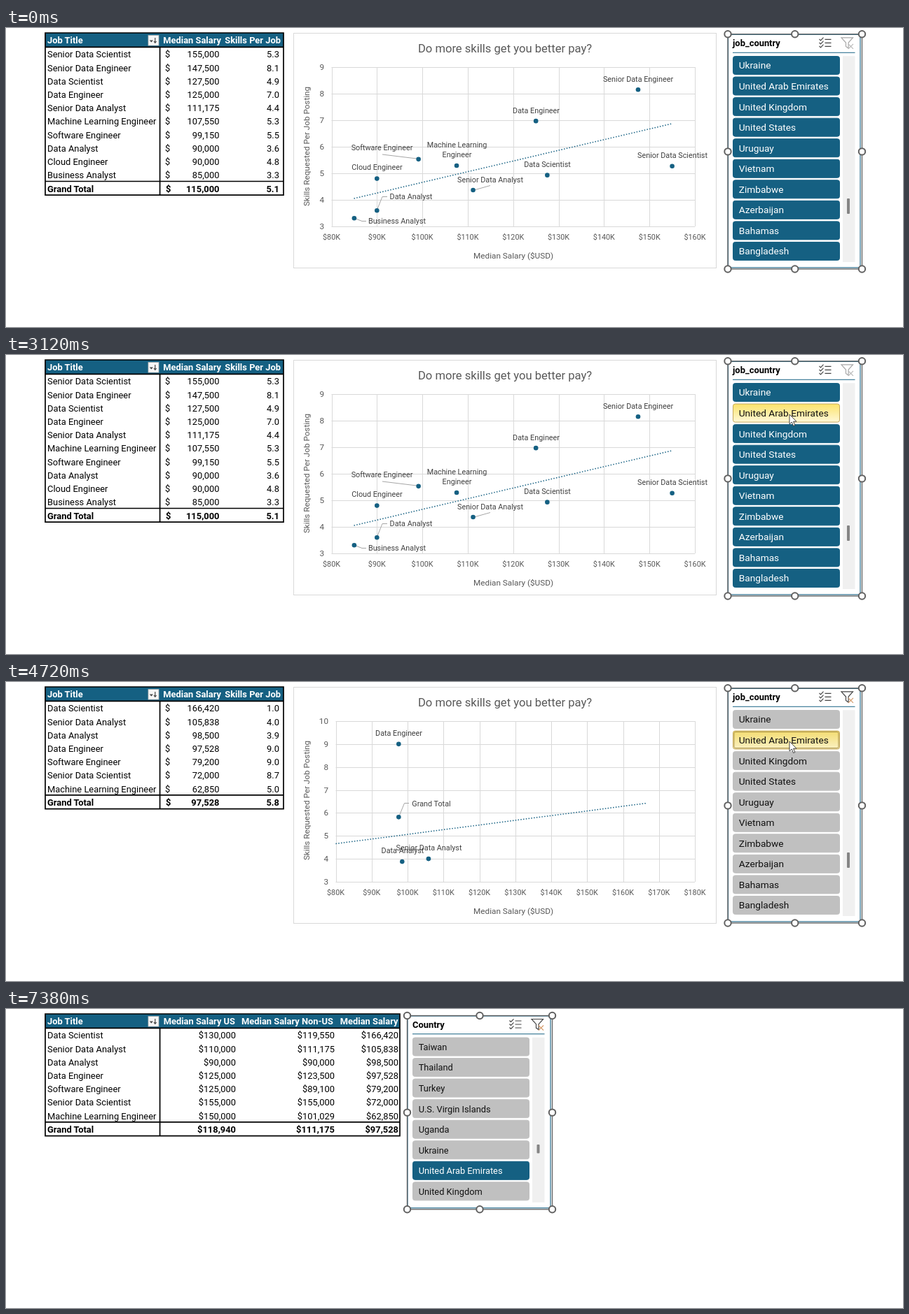
Write an HTML page that moves like this. It is 1280x428 px and loops after 8000 ms.

```html
<!DOCTYPE html>
<html lang="en">
<head>
<meta charset="utf-8">
<title>Skills and pay dashboard</title>
<style>
html, body { margin: 0; width: 100%; height: 100%; overflow: hidden; background: #fff; }
svg { display: block; width: 100%; height: 100%; font-family: Roboto, "Open Sans", sans-serif; }
text { white-space: pre; }
</style>
</head>
<body>
<svg id="stage" viewBox="0 0 1280 428"></svg>
<script>
const LOOP = 8000, TEAL = '#156082', GREY = '#c0c0c0';
const stage = document.getElementById('stage');

const text = (x, y, s, size, { anchor = 'start', fill = '#000', weight = 400, extra = '' } = {}) =>
  `<text x="${x}" y="${y}" font-size="${size}" text-anchor="${anchor}" fill="${fill}" font-weight="${weight}" ${extra}>${s}</text>`;
const rect = (x, y, w, h, fill, extra = '') =>
  `<rect x="${x}" y="${y}" width="${w}" height="${h}" fill="${fill}" ${extra}/>`;
const path = (d, stroke, width = 1, extra = '') =>
  `<path d="${d}" fill="none" stroke="${stroke}" stroke-width="${width}" ${extra}/>`;

// Tables: columns are { right, head, headRight }; a row is [title, ...cells].
function table(right, columns, rows, dollarColumn) {
  const pitch = 19.2, size = 12.9;
  const totalTop = 27.5 + (rows.length - 1) * pitch, bottom = totalTop + 19.7;
  let out = rect(55, 6, right - 55, bottom - 5, '#fff') + rect(56, 7, right - 57, 20.5, TEAL);
  const head = { fill: '#fff', weight: 700 };
  out += text(59, 22.3, 'Job Title', size, head);
  for (const c of columns) out += text(c.headRight, 22.3, c.head, size, { ...head, anchor: 'end' });
  rows.forEach((row, i) => {
    const last = i === rows.length - 1, weight = last ? 700 : 400;
    const y = 42.3 + i * pitch + (last ? 0.4 : 0);
    out += text(59, y, row[0], size, { weight });
    if (dollarColumn) out += text(last ? 228 : 227, y, '$', size, { weight });
    columns.forEach((c, k) => out += text(c.right, y, row[k + 1], size, { weight, anchor: 'end' }));
  });
  out += path(`M56 7H${right - 1}V${bottom}H56ZM56 27.3H${right - 1}M56 ${totalTop}H${right - 1}M219.6 27V${bottom}`, '#000', 1.7);
  return out + rect(203, 10.5, 15, 14.5, '#f7f7f7', 'stroke="#b5b5b5" stroke-width=".8"')
    + path('M212.8 14V21M211 19L212.8 21.3L214.6 19', '#444', 1.2)
    + '<path d="M204.8 17.5H210L207.4 20.5Z" fill="#444"/>';
}

function chart({ left, bottom, xTo, yTo, trend, points, labels, leaders }) {
  const right = 983, top = 56;
  const px = v => left + (v - 80) / (xTo - 80) * (right - left);
  const py = v => bottom - (v - 3) / (yTo - 3) * (bottom - top);
  const ink = '#595959', mid = { anchor: 'middle', fill: ink };
  let out = rect(410.5, 7.5, 603, bottom + 52, '#fff', 'stroke="#d9d9d9"');
  out += text(712, 35.3, 'Do more skills get you better pay?', 16.6, mid);
  for (let v = 80; v <= xTo; v += 10) {
    const x = Math.round(px(v)) + 0.5;
    out += path(`M${x} ${top}V${bottom}`, '#d9d9d9') + text(px(v), bottom + 19, `$${v}K`, 10.8, mid);
  }
  for (let v = 3; v <= yTo; v++) {
    const y = Math.round(py(v)) + 0.5;
    out += path(`M${left} ${y}H${right}`, '#d9d9d9')
      + text(left - 10.5, py(v) + 4, v, 11.7, { anchor: 'end', fill: ink });
  }
  out += text(724, bottom + 45.5, 'Median Salary ($USD)', 11.75, mid);
  out += text(0, 0, 'Skills Requested Per Job Posting', 11.7, { ...mid, extra: 'transform="translate(432.5 169.5) rotate(-90)"' });
  out += path(trend, TEAL, 1.5, 'stroke-dasharray="1.5 2.3"');
  for (const d of leaders) out += path(d, '#a6a6a6');
  for (const [x, y] of points) out += `<circle cx="${px(x)}" cy="${py(y)}" r="3.3" fill="${TEAL}"/>`;
  for (const [x, y, s] of labels) out += text(x, y, s, 10.8, { anchor: 'middle', fill: '#404040' });
  return out;
}

function icons(right, top, filtered) {
  const x = right - 61, f = right - 29.5, ink = filtered ? '#444' : '#a8a8a8';
  let out = '';
  for (let i = 0; i < 3; i++) {
    const y = top + 7.5 + i * 5;
    out += path(`M${x} ${y - .5}l2 2l4-4.2M${x + 8} ${y}h9`, '#444', 1.2);
  }
  out += path(`M${f} ${top + 5}h16.5l-6.4 7.2v8l-3.6-2.6v-5.4Z`, ink, 1.2);
  return out + path(`M${f + 10} ${top + 14}l7 7m0-7l-7 7`, filtered ? '#d39a6a' : '#b8b8b8', 1.2);
}

// style(i) gives the look of each button: 'blue', 'grey', 'hover', 'pressed' or 'focus'.
function slicer({ x, y, right, bottom, title, titleY, items, size, buttonX, buttonW, buttonY, thumb, filtered, style }) {
  const midX = (x + right) / 2, midY = (y + bottom) / 2, barX = buttonX + buttonW + 4;
  let out = rect(x, y, right - x, bottom - y, '#fff');
  out += rect(x + .5, y + .5, right - x - 3, bottom - y - 2.5, 'none', `stroke="${TEAL}" stroke-width="1.1"`);
  out += rect(x, y, right - x, bottom - y, 'none', 'stroke="#5f5f5f" stroke-width="1.3"');
  out += text(buttonX, titleY, title, 12.9, { weight: 700 }) + icons(right, y, filtered);
  out += path(`M${buttonX} ${buttonY - 5}H${barX + 17.5}`, TEAL, 1.1);
  items.forEach((name, i) => {
    const kind = style(i), top = buttonY + i * 29.55, yellow = kind === 'hover' || kind === 'pressed';
    const dark = kind === 'blue' || kind === 'focus';
    const fill = yellow ? `url(#${kind}Fill)` : dark ? TEAL : GREY;
    out += rect(buttonX + .5, top + .3, buttonW - 1, 26, fill, `rx="3" stroke="${yellow ? '#c5a95c' : fill}"`);
    if (kind === 'pressed' || kind === 'focus')
      out += rect(buttonX + 2, top + 1.8, buttonW - 4, 23, 'none', `rx="2" stroke="${dark ? '#a9c6d3' : '#a48d45'}" stroke-width=".9"`);
    out += text(buttonX + 8.7, top + 18.2, name, size, { fill: dark ? '#fff' : '#111' });
  });
  out += rect(barX, buttonY, 17.5, bottom - buttonY - 10, '#f0f0f0') + rect(...thumb, '#858585', 'rx="1"');
  for (const [cx, cy] of [[x, y], [midX, y], [right, y], [x, midY], [right, midY], [x, bottom], [midX, bottom], [right, bottom]])
    out += `<circle cx="${cx}" cy="${cy}" r="4.7" fill="#fff" stroke="#606060" stroke-width="2"/>`;
  return out;
}

const wideColumns = [
  { right: 328, headRight: 327, head: 'Median Salary US' },
  { right: 469, headRight: 467, head: 'Median Salary Non-US' },
  { right: 560, headRight: 559.5, head: 'Median Salary' }];
const narrowColumns = [
  { right: 304.5, headRight: 307, head: 'Median Salary' },
  { right: 390, headRight: 392, head: 'Skills Per Job' }];

const allJobs = [
  ['Senior Data Scientist', '155,000', '5.3'], ['Senior Data Engineer', '147,500', '8.1'],
  ['Data Scientist', '127,500', '4.9'], ['Data Engineer', '125,000', '7.0'],
  ['Senior Data Analyst', '111,175', '4.4'], ['Machine Learning Engineer', '107,550', '5.3'],
  ['Software Engineer', '99,150', '5.5'], ['Data Analyst', '90,000', '3.6'],
  ['Cloud Engineer', '90,000', '4.8'], ['Business Analyst', '85,000', '3.3'],
  ['Grand Total', '115,000', '5.1']];

// title, local median, skills, US median, non-US median
const filteredJobs = [
  ['Data Scientist', '166,420', '1.0', '130,000', '119,550'],
  ['Senior Data Analyst', '105,838', '4.0', '110,000', '111,175'],
  ['Data Analyst', '98,500', '3.9', '90,000', '90,000'],
  ['Data Engineer', '97,528', '9.0', '125,000', '123,500'],
  ['Software Engineer', '79,200', '9.0', '125,000', '89,100'],
  ['Senior Data Scientist', '72,000', '8.7', '155,000', '155,000'],
  ['Machine Learning Engineer', '62,850', '5.0', '150,000', '101,029'],
  ['Grand Total', '97,528', '5.8', '118,940', '111,175']];

const allChart = chart({
  left: 464.5, bottom: 284, xTo: 160, yTo: 9, trend: 'M496.5 244L950 137',
  points: [[155, 5.27], [147.5, 8.15], [127.5, 4.93], [125, 6.97], [111.175, 4.37], [107.55, 5.29],
    [99.15, 5.53], [90, 4.8], [90, 3.6], [85, 3.31]],
  labels: [[902, 76.8, 'Senior Data Engineer'], [756.5, 121.8, 'Data Engineer'], [951, 186, 'Senior Data Scientist'],
    [772.5, 199, 'Data Scientist'], [643.5, 170.5, 'Machine Learning'], [643.5, 184.8, 'Engineer'],
    [536.5, 175.2, 'Software Engineer'], [529.5, 203, 'Cloud Engineer'], [691, 220.8, 'Senior Data Analyst'],
    [578, 245.2, 'Data Analyst'], [558, 280.4, 'Business Analyst']],
  leaders: ['M537 181L586 187', 'M530 259L537 241.5H544', 'M499 273L508 276.5H514', 'M668 232L691 225.5']
});
const filteredChart = chart({
  left: 470.5, bottom: 286, xTo: 180, yTo: 10, trend: 'M470.5 231.5L914 173.5',
  points: [[97.528, 9], [97.528, 5.82], [98.5, 3.88], [105.838, 4]],
  labels: [[560.5, 76.8, 'Data Engineer'], [607, 177.6, 'Grand Total'], [603.5, 240.8, 'Senior Data Analyst'],
    [566, 244.8, 'Data Analyst']],
  leaders: ['M561 192L568.5 173.5H575']
});

const countrySlicer = (others, chosen, filtered) => slicer({
  x: 1030, y: 8.8, right: 1221.5, bottom: 345, title: 'job_country', titleY: 26.3, size: 13.7,
  items: ['Ukraine', 'United Arab Emirates', 'United Kingdom', 'United States', 'Uruguay', 'Vietnam', 'Zimbabwe',
    'Azerbaijan', 'Bahamas', 'Bangladesh'],
  buttonX: 1037, buttonW: 153, buttonY: 40.2, thumb: [1200, 244, 4, 22], filtered,
  style: i => i === 1 ? chosen : others
});
const finalSlicer = slicer({
  x: 572.5, y: 9.5, right: 779.5, bottom: 286.8, title: 'Country', titleY: 27.3, size: 12.8,
  items: ['Taiwan', 'Thailand', 'Turkey', 'U.S. Virgin Islands', 'Uganda', 'Ukraine', 'United Arab Emirates', 'United Kingdom'],
  buttonX: 580, buttonW: 167, buttonY: 40.7, thumb: [757.5, 194, 4, 12.5], filtered: true,
  style: i => i === 6 ? 'blue' : 'grey'
});

const parts = {
  finalTable: table(563, wideColumns, filteredJobs.map(([t, local, , us, other]) => [t, '$' + us, '$' + other, '$' + local])),
  finalSlicer,
  all: table(397, narrowColumns, allJobs, true) + allChart,
  filtered: table(397, narrowColumns, filteredJobs, true) + filteredChart,
  idle: countrySlicer('blue', 'blue', false),
  hover: countrySlicer('blue', 'hover', false),
  pressed: countrySlicer('grey', 'pressed', false),
  applied: countrySlicer('grey', 'pressed', true),
  selected: countrySlicer('grey', 'focus', true),
  click: '<circle cx="1117" cy="84.8" r="12" fill="#ff0" opacity=".55"/>',
  cursor: '<path d="M0 0V14L3.3 11L5.6 16.5L7.9 15.5L5.6 10.2H10Z" fill="#fff" stroke="#333" stroke-width=".9"/>'
};
const gradient = (id, top, bottom) =>
  `<linearGradient id="${id}" x2="0" y2="1"><stop stop-color="${top}"/><stop offset="1" stop-color="${bottom}"/></linearGradient>`;
stage.innerHTML = `<defs>${gradient('hoverFill', '#fbe36a', '#fff8d8')}${gradient('pressedFill', '#f3dc70', '#fbf1c4')}</defs>`
  + Object.entries(parts).map(([id, body]) => `<g id="${id}">${body}</g>`).join('');
const nodes = Object.fromEntries(Object.keys(parts).map(id => [id, document.getElementById(id)]));

// time, x, y of the pointer tip
const pointer = [[520, 1229, 347], [1000, 1122, 47], [1290, 1085, 110], [1360, 1085, 118], [1430, 1085, 128],
  [1570, 1085, 130], [1760, 1092.5, 119], [2320, 1118, 85], [5310, 1118, 85], [5520, 324, 372]];

function pointerAt(t) {
  const next = pointer.findIndex(k => k[0] > t);
  const i = next < 0 ? pointer.length - 1 : Math.max(1, next);
  const [t0, x0, y0] = pointer[i - 1], [t1, x1, y1] = pointer[i];
  const p = Math.min(1, Math.max(0, (t - t0) / (t1 - t0)));
  return [x0 + (x1 - x0) * p, y0 + (y1 - y0) * p];
}

function draw(t) {
  const within = (a, b) => t >= a && t < b ? 1 : 0;
  const fading = within(7250, 7340) * 0.15;
  const show = {
    finalTable: within(7250, LOOP),
    finalSlicer: within(7340, 7380) * 0.5 + within(7380, LOOP),
    all: within(0, 4450),
    filtered: within(4450, 7250) + fading,
    idle: within(0, 2980),
    hover: within(2980, 4320),
    pressed: within(4320, 4450),
    applied: within(4450, 5380),
    selected: within(5380, 7250) + fading,
    click: within(2980, 3120) + within(4250, 4450),
    cursor: within(520, 5590)
  };
  for (const id in show) {
    nodes[id].style.display = show[id] ? '' : 'none';
    nodes[id].style.opacity = show[id];
  }
  // The pointer advances in steps of 70 ms.
  const phase = t < 1760 ? 30 : 60;
  const stepped = Math.floor((t - phase) / 70) * 70 + phase;
  nodes.cursor.setAttribute('transform', `translate(${pointerAt(stepped)})`);
}

const start = performance.now();
function frame() {
  draw((performance.now() - start) % LOOP);
  requestAnimationFrame(frame);
}
draw(0);
requestAnimationFrame(frame);
</script>
</body>
</html>
```
